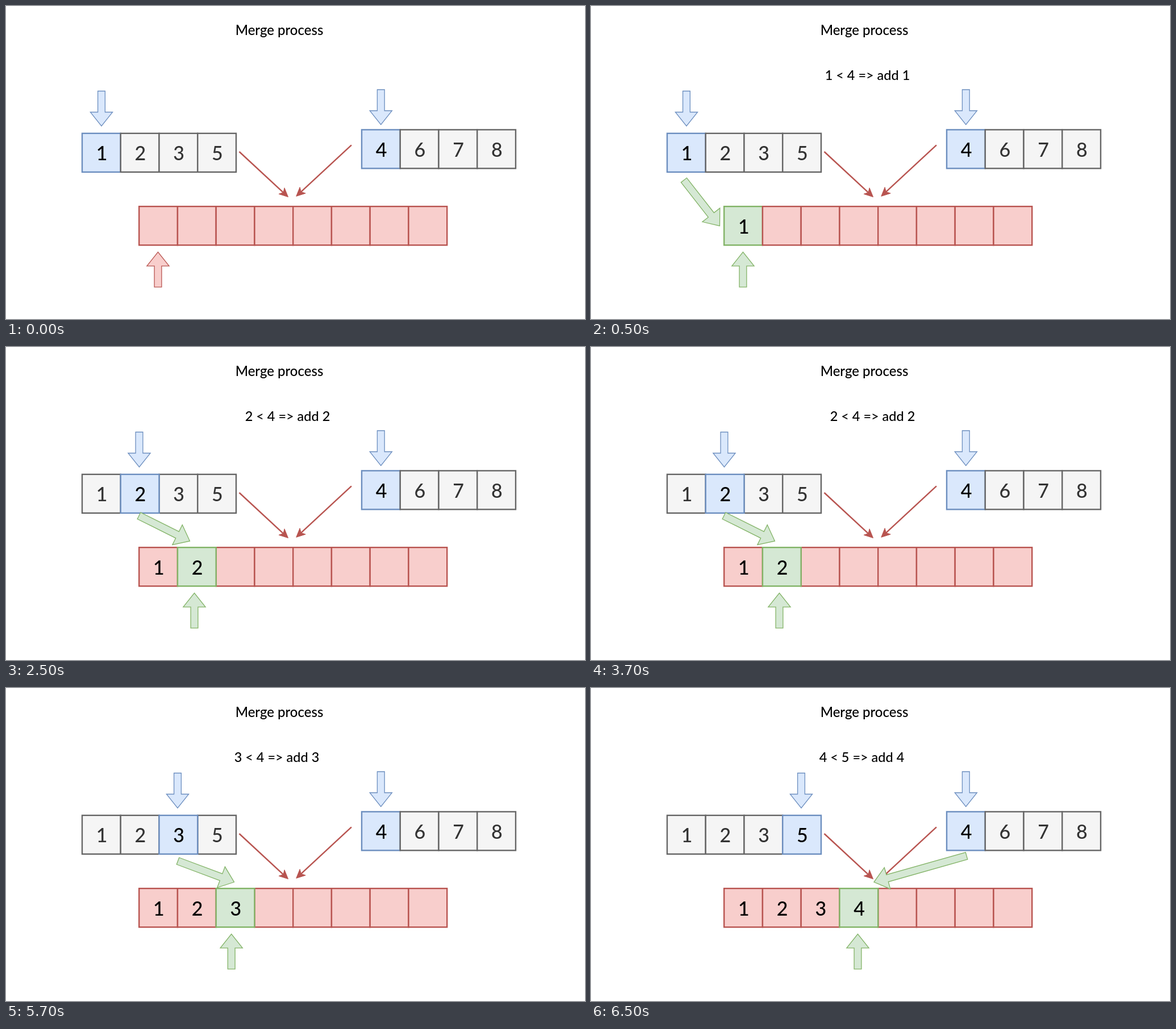
An HTML page that plays this animation: 1019 px wide and 550 px high, repeating every 8000 ms.

```html
<!DOCTYPE html>
<html lang="en">
<head>
<meta charset="utf-8">
<title>Merge process</title>
<style>
html, body { margin: 0; width: 100%; height: 100%; overflow: hidden; background: #fff; }
svg { display: block; width: 1019px; height: 550px; }
text { font-family: "Comic Sans MS", Lato, "Open Sans", sans-serif; font-weight: 500; text-anchor: middle; }
</style>
</head>
<body>
<svg id="stage" viewBox="0 0 1019 550"></svg>
<script>
const LOOP = 8000;
const CELL = 67.75;
const blue = { fill: '#dae8fc', line: '#6c8ebf', ink: '#000' };
const gray = { fill: '#f5f5f5', line: '#666666', ink: '#333' };
const red = { fill: '#f8cecc', line: '#b85450', ink: '#000' };
const green = { fill: '#d5e8d4', line: '#82b366', ink: '#000' };

// left: active cell, pos: pointer centre, out: tip of the lower pointer, move: tail and tip
const steps = [
  { at: 0, left: 0, pos: 168, out: 267.5, merged: 0 },
  { at: 500, left: 0, pos: 168, out: 267.5, merged: 1, note: '1 < 4 => add 1', noteX: 486.5, move: [163.5, 306, 226.5, 386.5] },
  { at: 2500, left: 1, pos: 234.5, out: 331.5, merged: 2, note: '2 < 4 => add 2', noteX: 495.5, move: [234, 296.5, 323.5, 341] },
  { at: 4500, left: 2, pos: 302, out: 396.7, merged: 3, note: '3 < 4 => add 3', noteX: 476.5, move: [302.5, 304, 401.5, 341] },
  { at: 6500, left: 3, pos: 370, out: 469.5, merged: 4, note: '4 < 5 => add 4', noteX: 476.5, move: [661, 295, 498, 341] }
];

const escapeText = s => String(s).replace(/&/g, '&amp;').replace(/</g, '&lt;').replace(/>/g, '&gt;');

function label(x, y, size, value, ink = '#000') {
  return `<text x="${x}" y="${y}" font-size="${size}" fill="${ink}">${escapeText(value)}</text>`;
}

function cell(x, y, value, look) {
  const box = `<rect x="${x}" y="${y}" width="${CELL}" height="68" fill="${look.fill}" stroke="${look.line}" stroke-width="2.4"/>`;
  return box + label(x + CELL / 2 + 0.8, y + 47.3, 34, value, look.ink);
}

function row(x, y, values, base, active, accent) {
  const order = values.map((_, i) => i);
  // An active inner cell lies above its neighbours
  if (active > 0) order.push(order.splice(active, 1)[0]);
  return order.map(i => cell(x + i * CELL, y, values[i], i === active ? accent : base)).join('');
}

// Points given as [distance back from the tip, sideways offset]
function alongTip(x1, y1, x2, y2, points) {
  const length = Math.hypot(x2 - x1, y2 - y1);
  const ux = (x2 - x1) / length, uy = (y2 - y1) / length;
  return points.map(([back, side]) =>
    `${(x2 - ux * back - uy * side).toFixed(2)},${(y2 - uy * back + ux * side).toFixed(2)}`).join(' ');
}

function blockArrow([x1, y1, x2, y2], look) {
  const length = Math.hypot(x2 - x1, y2 - y1);
  const points = alongTip(x1, y1, x2, y2, [
    [length, -6.4], [24.5, -6.4], [24.5, -19.6], [0, 0], [24.5, 19.6], [24.5, 6.4], [length, 6.4]
  ]);
  return `<polygon points="${points}" fill="${look.fill}" stroke="${look.line}" stroke-width="1.3"/>`;
}

function thinArrow(x1, y1, x2, y2) {
  const head = alongTip(x1, y1, x2, y2, [[0, 0], [15.5, 7.3], [11.5, 0], [15.5, -7.3]]);
  const end = alongTip(x1, y1, x2, y2, [[11, 0]]);
  return `<polyline points="${x1},${y1} ${end}" fill="none" stroke="${red.line}" stroke-width="2.4"/>` +
    `<polygon points="${head}" fill="${red.line}" stroke="${red.line}"/>`;
}

function scene(s) {
  const result = Array.from({ length: 8 }, (_, i) => i < s.merged ? i + 1 : '');
  return [
    '<rect width="1019" height="550" fill="#fff"/>',
    label(481, 50.5, 24, 'Merge process'),
    s.note ? label(s.noteX, 129.5, 23.5, s.note) : '',
    row(134, 223.8, [1, 2, 3, 5], gray, s.left, blue),
    row(626, 217.4, [4, 6, 7, 8], gray, 0, blue),
    row(234.2, 352.2, result, red, s.merged - 1, green),
    blockArrow([s.pos, 149.5, s.pos, 211], blue),
    blockArrow([659.8, 147, 659.8, 208.5], blue),
    thinArrow(410.5, 256, 496.5, 335.5),
    thinArrow(608, 244.3, 510.8, 334.3),
    blockArrow([s.out, 493.8, s.out, 432.3], s.merged ? green : red),
    s.move ? blockArrow(s.move, green) : ''
  ].join('');
}

const stage = document.getElementById('stage');
const start = performance.now();
let shown = null;

function draw() {
  const time = (performance.now() - start) % LOOP;
  const step = steps.filter(s => s.at <= time).pop();
  if (step !== shown) {
    stage.innerHTML = scene(step);
    shown = step;
  }
  requestAnimationFrame(draw);
}
draw();
</script>
</body>
</html>
```
